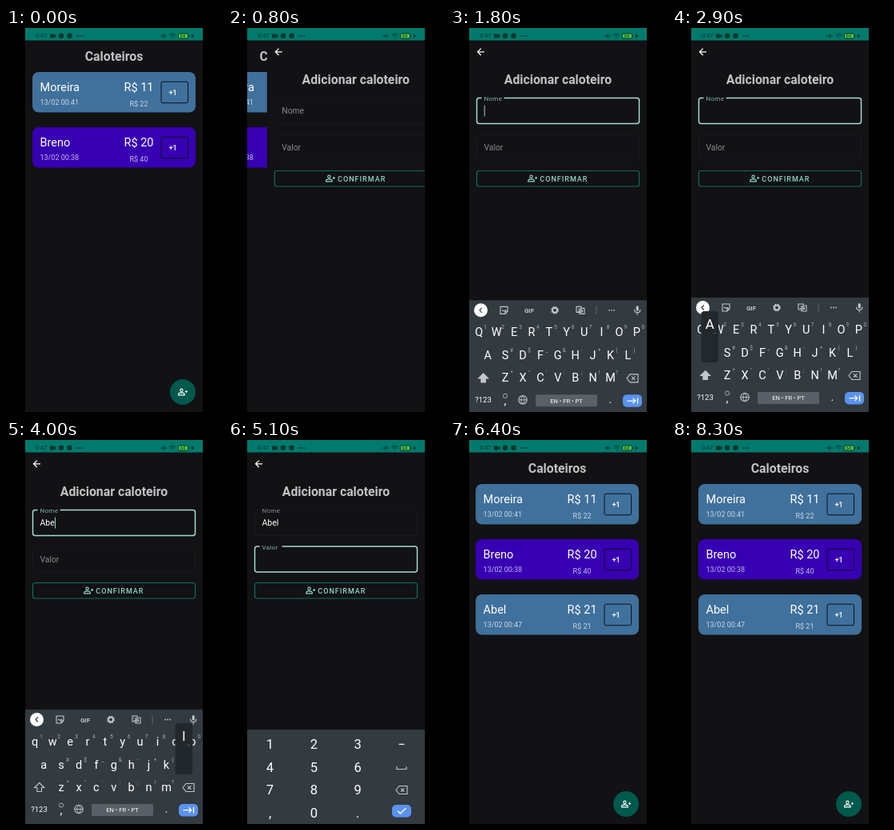
An HTML page for the animation above (8400 ms loop, 270 px wide and 480 px high).

```html
<!DOCTYPE html>
<html lang="pt">
<head>
<meta charset="utf-8">
<title>Caloteiros</title>
<style>
html, body { margin: 0; width: 100%; height: 100%; overflow: hidden; background: #000; }
svg { display: block; width: 270px; height: 480px; font-family: Roboto, sans-serif; }
text { fill: #fff; white-space: pre; }
.mid { text-anchor: middle; }
.page { fill: #121114; }
.title { font-size: 15.8px; font-weight: 700; fill: #c2c1c3; text-anchor: middle; }
.big { font-size: 14.5px; }
.small { font-size: 9px; fill: #fff; fill-opacity: .72; }
.plus { font-size: 9.5px; font-weight: 500; letter-spacing: -.5px; text-anchor: middle; }
.line { fill: none; stroke: #fff; stroke-width: 1.3; }
.box { fill: none; stroke: #19181b; }
.tag { fill: #8b8a8c; }
.val { font-size: 10.5px; }
.caret { stroke: #8fd6c8; visibility: hidden; }
.notch { visibility: hidden; }
.focus .box { stroke: #9fded1; stroke-width: 1.5; }
.focus .tag { fill: #80b8ad; }
.focus .notch, .caret.on { visibility: visible; }
.confirm { font-size: 9px; font-weight: 500; letter-spacing: 1px; fill: #8fd6c8; }
.keys { fill: #333a40; }
.key { font-size: 14.5px; text-anchor: middle; }
.hint { font-size: 6.5px; fill: #a9aeb3; text-anchor: middle; }
.num { font-size: 16.5px; text-anchor: middle; }
.icon { fill: none; stroke: #c3c7cb; stroke-width: 1.1; }
.blue { fill: #5a93ef; }
.status text, .status .dark { fill: #05372f; }
.status .thin { fill: none; stroke: #05372f; }
</style>
</head>
<body>
<svg id="stage" viewBox="0 0 270 480"></svg>
<script>
const LOOP = 8400, STEP = 100, WIDTH = 222;
const NAME = 'Abel', VALUE = '21';
const ROWS = [
  { keys: 'QWERTYUIOP', hints: '1234567890', x: 36.2, y: 382 },
  { keys: 'ASDFGHJKL', hints: '@#$_&-+()', x: 47.2, y: 411 },
  { keys: 'ZXCVBNM', hints: '*"\':;!?', x: 69.1, y: 439 }
];
const PITCH = 21.9;
const PAD = [['1', '2', '3', '−'], ['4', '5', '6', ''], ['7', '8', '9', ''], [',', '0', '.', '']];
const padX = c => 52.5 + c * 54.8;
const padY = r => 386 + r * 28.6;

const text = (x, y, cls, s) => `<text x="${x}" y="${y}" class="${cls}">${s}</text>`;
const path = (d, cls = 'icon', extra = '') => `<path d="${d}" class="${cls}" ${extra}/>`;
const rect = (x, y, w, h, r, attrs) =>
  `<rect x="${x}" y="${y}" width="${w}" height="${h}" rx="${r}" ${attrs}/>`;
const dots = (x, y, gap, fill) => [-1, 0, 1]
  .map(i => `<circle cx="${x + i * gap}" cy="${y}" r=".9" fill="${fill}"/>`).join('');

// Person with a plus sign, centred on x, y
const person = (x, y, color) => `<g transform="translate(${x - 6.6} ${y - 6.6}) scale(.55)"
  fill="none" stroke="${color}" stroke-width="2"><circle cx="9" cy="8" r="3"/>
  <path d="M2 19v-1.5c0-2.5 4-4 7-4s7 1.5 7 4V19zM20 8v6M17 11h6"/></g>`;

const backspace = (x, y) =>
  path(`M${x - 7} ${y}l4-5h10v10h-10zM${x - 1} ${y - 2.2}l4.4 4.4m0-4.4l-4.4 4.4`);

const card = (id, y, color, name, time, owed, total) => `<g id="${id}">
  ${rect(33, y, 204, 50.5, 8, `fill="${color}"`)}
  ${text(42.5, y + 24, 'big', name)}
  ${text(42.5, y + 40.5, 'small', '13/02 ' + time)}
  ${text(147.5, y + 24, 'big', 'R$ ' + owed)}
  ${text(166, y + 42.5, 'small mid', 'R$ ' + total)}
  ${rect(194, y + 12.2, 33.5, 26.5, 2, 'fill="none" stroke="#0c1219"')}
  ${text(208.3, y + 28.5, 'plus', '+1')}</g>`;

const field = (id, y, label) => `<g id="${id}" data-y="${y}">
  ${rect(33.5, y, 203, 32, 3, 'class="box"')}
  ${rect(39.5, y - 2, 28, 4, 0, 'class="page notch"')}
  ${text(42.5, 0, 'tag', label)}${text(42.5, y + 19.5, 'val', '')}
  ${path(`M0 ${y + 9}v14`, 'caret')}</g>`;

const status = () => `<g class="status">
  ${rect(24, 0, WIDTH, 15.5, 0, 'fill="#007a6c"')}
  <text x="37" y="12.3" font-size="7.6">0:47</text>
  ${path('M55 7.5h5v1.2l2.5-1.2v5l-2.5-1.2v1.2h-5z', 'dark')}
  <circle cx="69" cy="9.8" r="3.3" class="dark"/><circle cx="79.5" cy="9.8" r="3.3" class="dark"/>
  ${dots(92.3, 10, 3, '#05372f')}
  ${path('M193 10h8M198 7l-2 3 2 3', 'thin')}
  ${path('M204.5 8.5q3.8-3 7.6 0M206 10.5q2.3-2 4.6 0M208.3 12v1', 'thin')}
  ${rect(215.5, 7, 12, 6, 1.5, 'fill="#56c43c" stroke="#05372f"')}
  <text x="217.5" y="12.2" font-size="6">64</text>
  ${path('M228.6 9v2', 'thin')}${path('M232 7.5l3.5 2.5-3.5 2.5z', 'dark')}</g>`;

const letterKeys = () => ROWS.map(row => [...row.keys].map((k, i) => {
  const x = row.x + i * PITCH;
  const hint = row.hints[i] === '@' ? '' : row.hints[i].replace('&', '&amp;');
  return text(x, row.y, 'key letter', k) + text(x + 8, row.y - 9, 'hint', hint);
}).join('')).join('');

const toolbar = () => `<circle cx="38.5" cy="349.5" r="8.5" fill="#fff"/>
  ${path('M40 346.5l-3 3 3 3', 'icon', 'style="stroke:#30363b"')}
  ${path('M63 345h9v6l-3 3h-6zM72 351h-3v3M65 349q2.5 2.5 5 0')}
  <text x="99" y="352.5" class="mid" font-size="8" font-weight="700" style="fill:#c3c7cb">GIF</text>
  <circle cx="131" cy="349.5" r="3" class="icon" style="stroke-width:2"/>
  <circle cx="131" cy="349.5" r="4.3" class="icon" style="stroke-dasharray:1.7 1.7"/>
  ${path('M158 345h6v7h-6zM164 347h4v7h-6v-2M160 350.5h2.5v-2.5h-2M165.5 349v3')}
  ${path('M183 344v11', 'icon', 'opacity=".3"')}${dots(202, 349.5, 3, '#c3c7cb')}
  ${rect(232.7, 344, 3, 6.5, 1.5, 'fill="#c3c7cb"')}
  ${path('M230.5 348.5q0 4 3.7 4t3.7-4M234.2 352.5v3')}`;

const letters = () => `<g id="letters">${rect(24, 337, WIDTH, 143, 0, 'class="keys"')}
  ${toolbar()}${letterKeys()}
  ${path('M41.7 428.5l6 6h-3.2v5h-5.6v-5h-3.2z', 'icon', 'id="shift" style="fill:#c3c7cb"')}
  ${backspace(228, 434.5)}
  <text x="41.5" y="465" class="mid" font-size="9.5">?123</text>
  ${text(69, 468, 'key', ',')}<circle cx="69" cy="456.5" r="2.6" class="icon" style="stroke-width:.8"/>
  <circle cx="91" cy="461.5" r="5.2" class="icon"/>
  ${path('M86 461.5h10M91 456.3q-4.5 5.2 0 10.4q4.5-5.2 0-10.4', 'icon', 'style="stroke-width:.9"')}
  ${rect(107, 455, 77, 15, 2, 'fill="#596067"')}
  <text x="145.5" y="465.4" class="mid" font-size="7.6">EN • FR • PT</text>
  ${text(200.5, 465.5, 'key', '.')}
  ${rect(216, 455, 24, 15.5, 5, 'class="blue" id="next"')}
  ${path('M221.5 462.7h10M228.5 459.5l3.2 3.2-3.2 3.2M234.5 459v7.4', 'line')}
  <g id="popup">${rect(-10.8, -57, 21.6, 64, 4, 'fill="#23282c"')}
  <text id="pressed" y="-35" class="mid" font-size="17"></text>${text(6, -29, 'hint', '…')}</g></g>`;

const numbers = () => `<g id="numbers">${rect(24, 362, WIDTH, 118, 0, 'class="keys"')}
  ${rect(0, 0, 48, 25, 4, 'id="glow" fill="#fff" fill-opacity=".1"')}
  ${PAD.map((row, r) => row.map((k, c) => text(padX(c), padY(r), 'num', k)).join('')).join('')}
  ${path('M211 408v3.5h12v-3.5')}${backspace(217, 437.5)}
  ${rect(205, 456, 24, 15.5, 5, 'class="blue"')}${path('M212 463.5l3.5 3.5 7-7', 'line')}</g>`;

const stage = document.getElementById('stage');
stage.innerHTML = `<clipPath id="screen"><rect x="24" width="${WIDTH}" height="480"/></clipPath>
<g clip-path="url(#screen)">
  ${rect(24, 0, WIDTH, 480, 0, 'class="page"')}
  <g id="list">${text(135, 41.3, 'title', 'Caloteiros')}
    ${card('first', 55, '#40709c', 'Moreira', '00:41', 11, 22)}
    ${card('second', 124, '#3700b3', 'Breno', '00:38', 20, 40)}
    ${card('third', 193, '#40709c', NAME, '00:47', 21, 21)}
    <circle id="fab" cx="221" cy="455" r="16"/>${person(221, 455, '#fff')}</g>
  <g id="add">${rect(24, 0, WIDTH, 480, 0, 'class="page"')}
    ${path('M43 29.8h-8.5M38.7 25.6l-4.2 4.2 4.2 4.2', 'line')}
    ${text(135, 70, 'title', 'Adicionar caloteiro')}
    ${field('name', 87.5, 'Nome')}${field('value', 133, 'Valor')}
    ${rect(0, 178.5, 0, 19.5, 3, 'id="ripple" fill="#00796b" fill-opacity=".25"')}
    ${rect(33.5, 178.5, 203, 19.5, 3, 'fill="none" stroke="#0a6f61" stroke-width="1.2"')}
    ${person(103.2, 188, '#8fd6c8')}${text(112.3, 191.8, 'confirm', 'CONFIRMAR')}
    ${letters()}${numbers()}</g>
  ${status()}
</g>`;

const $ = id => document.getElementById(id);
const letterNodes = [...document.querySelectorAll('.letter')];
const clamp = v => Math.min(1, Math.max(0, v));
const ease = v => 1 - (1 - clamp(v)) ** 3;
const within = (t, a, b) => t >= a && t < b;
const show = (id, on) => $(id).style.display = on ? '' : 'none';
const move = (id, x, y) => $(id).setAttribute('transform', `translate(${x} ${y})`);
const reached = (t, times) => times.filter(at => t >= at).length;

// Critically damped spring from 0 to 1
const spring = (t, start) => {
  const s = Math.max(0, t - start) * .015;
  return 1 - Math.exp(-s) * (1 + s);
};

function setField(id, focused, lift, value, caret) {
  const g = $(id), y = +g.dataset.y;
  const tag = g.querySelector('.tag'), val = g.querySelector('.val'), bar = g.querySelector('.caret');
  g.classList.toggle('focus', focused);
  tag.setAttribute('y', y + 19.5 - 16 * lift);
  tag.style.fontSize = 10.3 - 2.3 * lift + 'px';
  tag.style.letterSpacing = .3 * lift + 'px';
  val.textContent = value;
  bar.classList.toggle('on', caret);
  const width = value ? val.getComputedTextLength() : 0;
  bar.setAttribute('transform', `translate(${43.2 + width} 0)`);
}

function setPopup(letter, upper) {
  show('popup', letter);
  if (!letter) return;
  const row = ROWS.find(r => r.keys.includes(letter.toUpperCase()));
  move('popup', row.x + row.keys.indexOf(letter.toUpperCase()) * PITCH, row.y);
  $('pressed').textContent = upper ? letter.toUpperCase() : letter;
}

function render(t) {
  const open = spring(t, 550), close = spring(t, 5983);
  const cover = t < 5983 ? open : 1 - close;
  move('list', -.3 * WIDTH * cover, 0);
  move('add', WIDTH * (1 - cover), 0);
  show('add', within(t, 550, 6800));
  show('third', t >= 6100);
  $('fab').setAttribute('fill', within(t, 400, 700) ? '#2b7569' : '#00594d');

  const typed = reached(t, [3000, 3200, 4000, 4100]);
  const nameCaret = within(t, 1400, 2400) || within(t, 3000, 3400) || within(t, 3900, 4400);
  setField('name', within(t, 1300, 4700), clamp((t - 1200) / 200), NAME.slice(0, typed), nameCaret);

  const digits = reached(t, [5300, 5500]);
  const valueCaret = within(t, 4800, 5100) || t >= 5300;
  setField('value', t >= 4700, clamp((t - 4600) / 200), VALUE.slice(0, digits), valueCaret);

  const upper = t < 3000;
  letterNodes.forEach(n => {
    n.textContent = upper ? n.textContent.toUpperCase() : n.textContent.toLowerCase();
  });
  $('shift').style.fill = upper ? '#c3c7cb' : 'none';
  const presses = [2900, 3100, 3900, 4000];
  const hit = presses.findIndex(at => within(t, at, at + STEP));
  setPopup(NAME[hit], upper);
  $('next').style.fillOpacity = within(t, 4600, 4700) ? .7 : 1;
  show('letters', within(t, 1600, 4700));
  move('letters', 0, 143 * (1 - ease((t - 1550) / 350)));

  show('numbers', t >= 4700);
  move('numbers', 0, 118 * clamp((t - 6000) / 300));
  const digit = within(t, 5300, 5400) ? 1 : within(t, 5500, 5600) ? 0 : -1;
  show('glow', digit >= 0);
  move('glow', padX(digit) - 24, padY(0) - 18.5);

  const spread = within(t, 5900, 6800) ? Math.min(203, 110 + (t - 5900) * .84) : 0;
  $('ripple').setAttribute('x', 236.5 - spread);
  $('ripple').setAttribute('width', spread);
}

const start = performance.now();
function tick() {
  const t = (performance.now() - start) % LOOP;
  render(Math.floor(t / STEP) * STEP);
  requestAnimationFrame(tick);
}
tick();
</script>
</body>
</html>
```
